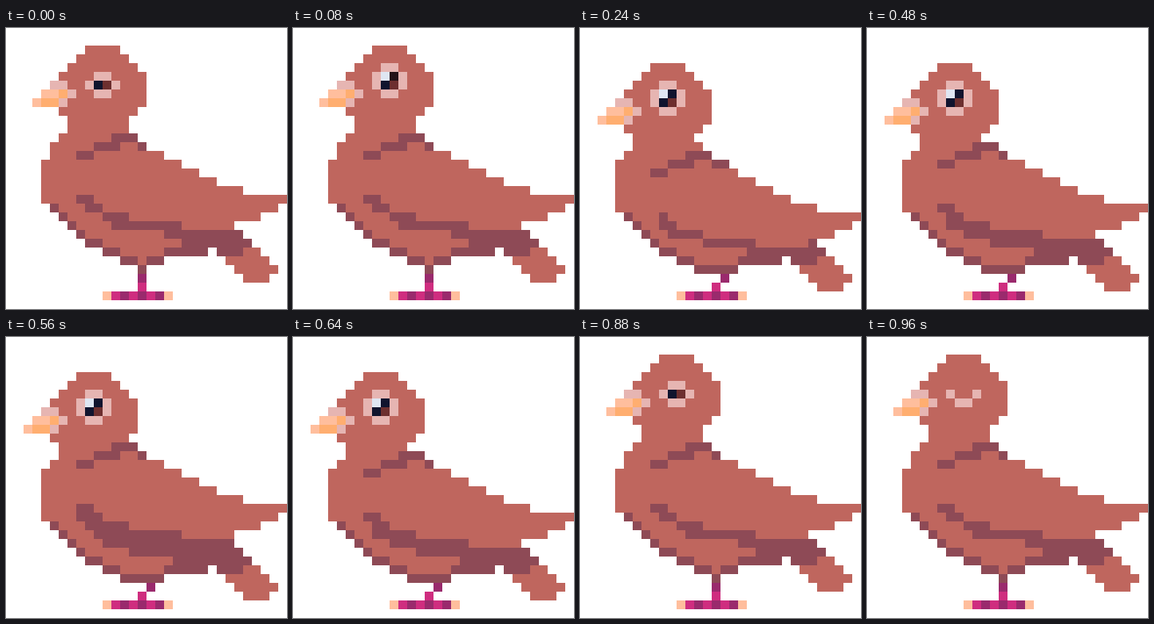
Recreate the animation shown at these times as an HTML page with a canvas. Size 352 by 352 pixels, loop 1120 ms.

```html
<!DOCTYPE html>
<html lang="en">
<head>
<meta charset="utf-8">
<title>Pigeon</title>
<style>
  html, body { margin: 0; width: 100%; height: 100%; overflow: hidden; background: #fff; }
  canvas { display: block; }
</style>
</head>
<body>
<canvas id="stage" width="352" height="352"></canvas>
<script>
const ctx = document.getElementById('stage').getContext('2d');
const CELL = 11, LOOP = 1120;
const BODY = '#bf665e', DARK = '#8e4a56', PINK = '#e6b5b2', LIGHT = '#ffbe9d', ORANGE = '#ffae70',
  MAGENTA = '#cf2d7f', PURPLE = '#9a2a6d', NAVY = '#10142e', BROWN = '#6d2f2f', GLINT = '#dfe6f2',
  UMBER = '#241318';

// Outlines in cells, for the upright bird
const HEAD = 'M9 2h4v1h1v1h1v1h1v4h-1v1h-1v2H7v-2H6V5h1V4h1V3h1z';
const BELLY = 'M6 12h8v11h4v1h2v1h-2v1h-2v1h-3v-1h-2v-1H9v-1H8v-1H7v-1H6v-1H5v-1H4v-5h1v-2h1z';
const WING = 'M10 13h6v1h2v1h2v1h2v1h2v1h3v1h5v1h-1v1h-2v1h-3v1H10z';

// Shade below the wing: upright, then crouched with the wing raised by 0, 1, 2 cells
const STAND_SHADE = 'M8 19h2M9 20h2M11 21h3M12 22h8';
const CROUCH_SHADE = [
  'M9 21h1M9 22h2M10 23h4M14 24h6M16 15h1',
  'M8 20h2M9 21h2M9 22h5M11 23h9M14 24h12',
  'M8 19h2M8 20h3M9 21h5M10 22h10M11 23h15M14 24h12'
];

const EYE_RIM = {
  open: 'M10 4h2M9 5h1M12 5h1M9 6h1M12 6h1M10 7h2',
  half: 'M10 5h2M9 6h1M12 6h1M10 7h2',
  shut: 'M9 6h1M12 6h1M10 7h2'
};

// Each step holds from its time until the next one
const steps = [
  { at: 0, eye: 'half' },
  { at: 80, eye: 'open', pupil: UMBER },
  { at: 160, eye: 'open' },
  { at: 240, eye: 'open', crouch: 1, lift: 0 },
  { at: 480, eye: 'open', crouch: 1, lift: 1 },
  { at: 560, eye: 'open', crouch: 1, lift: 2 },
  { at: 640, eye: 'open', crouch: 1, lift: 1 },
  { at: 720, eye: 'open', pupil: UMBER },
  { at: 880, eye: 'half' },
  { at: 960, eye: 'shut' }
];

function shift(x, y) {
  ctx.setTransform(CELL, 0, 0, CELL, x * CELL, y * CELL);
}

function shape(color, d) {
  ctx.fillStyle = color;
  ctx.fill(new Path2D(d));
}

// Horizontal runs, one cell high, placed by their top left corner
function runs(color, d) {
  ctx.save();
  ctx.translate(0, 0.5);
  ctx.strokeStyle = color;
  ctx.lineWidth = 1;
  ctx.stroke(new Path2D(d));
  ctx.restore();
}

function drawBody(crouch) {
  shift(0, crouch);
  shape(BODY, BELLY);
  runs(BODY, 'M27 25h2M25 26h5M26 27h5M27 28h3');
  runs(DARK, 'M5 20h1M6 21h1M7 22h1M8 23h1M9 24h2M11 25h2M13 26h2M16 26h2');
  runs(DARK, 'M18 23h9M20 24h8M18 25h5M24 25h3');
  if (crouch) runs(DARK, 'M4 0M15 26h1M19 24h1');
  if (crouch) runs(BODY, 'M4 14h1');
}

function drawHead(crouch, eye, pupil) {
  shift(-crouch, 2 * crouch);
  shape(BODY, HEAD);
  runs(PINK, 'M5 6h2M7 7h1M6 8h1');
  runs(LIGHT, 'M4 7h2M3 8h1');
  runs(ORANGE, 'M6 7h1M4 8h2');
  runs(PINK, EYE_RIM[eye]);
  if (eye === 'shut') return;
  runs(NAVY, 'M10 6h1');
  runs(BROWN, 'M11 6h1');
  if (eye === 'half') return;
  runs(GLINT, 'M10 5h1');
  runs(pupil, 'M11 5h1');
}

function drawWing(crouch, lift) {
  shift(0, crouch ? 2 - lift : 0);
  shape(BODY, WING);
  runs(DARK, 'M12 12h3M10 13h3M15 13h1M8 14h2');
  shift(0, 0);
  runs(DARK, crouch ? CROUCH_SHADE[lift] : STAND_SHADE);
}

function drawLeg(crouch) {
  shift(0, 0);
  if (!crouch) runs(DARK, 'M15 27h1');
  runs(PURPLE, crouch ? 'M16 28h1' : 'M15 28h1');
  runs(MAGENTA, 'M15 29h1M12 30h6');
  runs(PURPLE, 'M13 30h1M15 30h1M17 30h1');
  runs(LIGHT, 'M11 30h1M18 30h1');
}

function draw(now) {
  const t = now % LOOP;
  const { eye, pupil = NAVY, crouch = 0, lift = 0 } = steps.findLast(s => s.at <= t);
  shift(0, 0);
  ctx.fillStyle = '#fff';
  ctx.fillRect(0, 0, 32, 32);
  drawBody(crouch);
  drawHead(crouch, eye, pupil);
  drawWing(crouch, lift);
  drawLeg(crouch);
}

let start;
function tick(now) {
  start ??= now;
  draw(now - start);
  requestAnimationFrame(tick);
}
draw(0);
requestAnimationFrame(tick);
</script>
</body>
</html>
```
